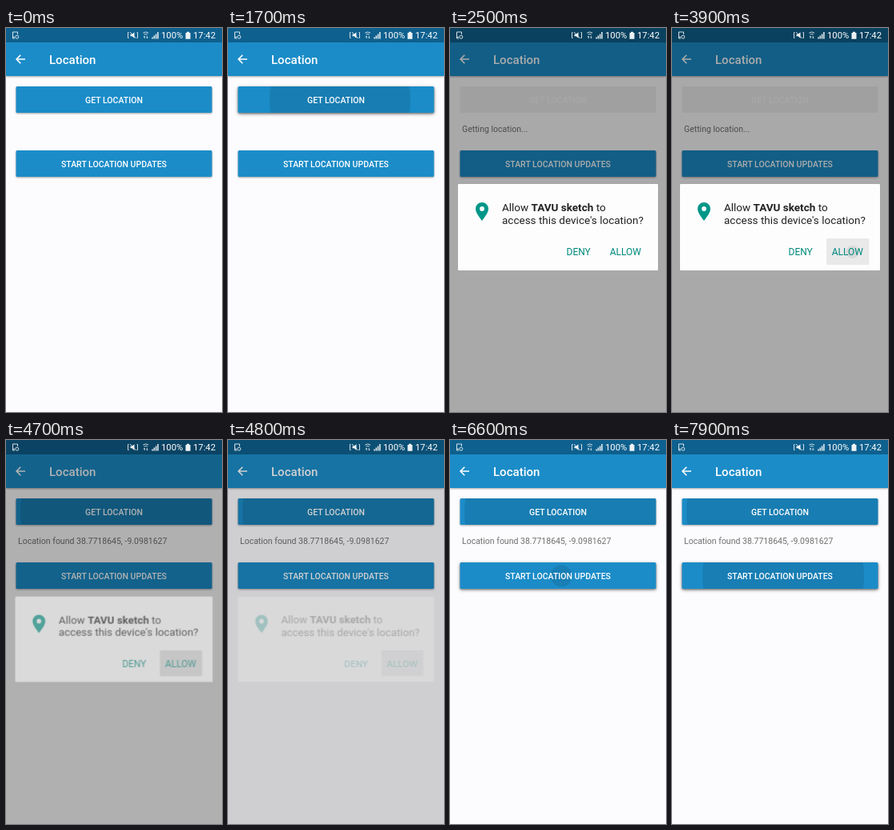
Write an HTML page that moves like this. It is 270x480 px and loops after 8000 ms.

```html
<!DOCTYPE html>
<html lang="en">
<head>
<meta charset="utf-8">
<title>Location</title>
<style>
  html, body { margin: 0; width: 100%; height: 100%; overflow: hidden; background: #fcfbfd; }
  svg { display: block; width: 100vw; height: 100vh; font-family: Roboto, Arial, sans-serif; }

  .button-label { font-size: 10.5px; font-weight: 500; fill: #fff; text-anchor: middle; }
  .status-text { font-size: 11.25px; fill: #fff; }
  .note { font-size: 10.5px; fill: #707070; }
  .question { font-size: 13.5px; fill: #212121; }
  .action { font-size: 12px; fill: #00897b; }
  .shadow { filter: blur(1px); opacity: .34; }
  .lift { filter: blur(2px); opacity: 0; }

  /* One shared 8 s clock: 1% = 80 ms */
  .anim { animation: 8s linear infinite; }
  .step { animation: 8s step-end infinite; }

  #get-lift { animation-name: get-lift; }
  #get-ripple { animation-name: get-ripple; }
  #get-on { animation-name: get-on; }
  #get-off, #pending { animation-name: waiting; }
  #found { animation-name: found; }
  #dim { animation-name: dim; }
  #dialog { animation-name: dialog; transform-origin: 134.5px 249px; }
  #allow-hold { animation-name: allow-hold; }
  #allow-ripple { animation-name: allow-ripple; }
  #start-lift { animation-name: start-lift; }
  #start-ripple { animation-name: start-ripple; }

  @keyframes get-lift {
    0%, 5% { opacity: 0; }
    8%, 27.4% { opacity: .4; }
    27.5%, 100% { opacity: 0; }
  }
  @keyframes get-ripple {
    0%, 5% { r: 0px; }
    27.5%, 100% { r: 122px; }
  }
  @keyframes get-on {
    0% { opacity: 1; }
    27.5% { opacity: 0; }
    56.25%, 100% { opacity: 1; }
  }
  @keyframes waiting {
    0% { opacity: 0; }
    27.5% { opacity: 1; }
    56.25%, 100% { opacity: 0; }
  }
  @keyframes found {
    0% { opacity: 0; }
    56.25%, 100% { opacity: 1; }
  }
  @keyframes dim {
    0%, 27.5% { opacity: 0; }
    30.6%, 58.5% { opacity: .33; }
    61.8%, 100% { opacity: 0; }
  }
  @keyframes dialog {
    0%, 27.5% { opacity: 0; transform: scale(.97); }
    30.6%, 56.9% { opacity: 1; transform: none; }
    58.75% { opacity: .55; transform: scale(.988); }
    60.9%, 100% { opacity: 0; transform: scale(.975); }
  }
  @keyframes allow-hold {
    0%, 43.75% { opacity: 0; }
    47.5%, 100% { opacity: .08; }
  }
  @keyframes allow-ripple {
    0%, 43.75% { r: 0px; }
    48.75% { r: 8px; }
    55% { r: 18px; }
    58%, 100% { r: 42px; }
  }
  @keyframes start-lift {
    0%, 80% { opacity: 0; }
    83%, 100% { opacity: .4; }
  }
  @keyframes start-ripple {
    0%, 80% { r: 0px; }
    100% { r: 107.7px; }
  }
</style>
</head>
<body>
<svg viewBox="0 0 270 480">
  <defs>
    <rect id="button" x="12.5" width="245" height="33" rx="1.5"/>
    <clipPath id="get-clip"><use href="#button" y="73"/></clipPath>
    <clipPath id="start-clip"><use href="#button" y="153"/></clipPath>
    <clipPath id="allow-clip"><rect x="193" y="263" width="53.5" height="33" rx="1.5"/></clipPath>
  </defs>

  <rect width="270" height="480" fill="#fcfbfd"/>

  <!-- App bar -->
  <rect class="shadow" y="40" width="270" height="21"/>
  <rect y="18" width="270" height="42" fill="#1b8cc8"/>
  <rect width="270" height="18" fill="#0e608e"/>
  <path d="M24 39H13.5M18.3 33.8L13.1 39l5.2 5.2" fill="none" stroke="#fff" stroke-width="1.6"/>
  <text x="54" y="45" font-size="15" font-weight="500" fill="#fff">Location</text>

  <!-- Get location -->
  <g id="get-off" class="step">
    <use href="#button" y="73" fill="#eeeeee"/>
    <text class="button-label" x="135" y="93.5" style="fill:#f9f9f9">GET LOCATION</text>
  </g>
  <g id="get-on" class="step">
    <use id="get-lift" class="lift anim" href="#button" y="74.5"/>
    <use class="shadow" href="#button" y="74"/>
    <use href="#button" y="73" fill="#1b8cc8"/>
    <g clip-path="url(#get-clip)">
      <circle id="get-ripple" class="anim" cx="140" cy="90" r="0" opacity=".11"/>
    </g>
    <text class="button-label" x="135" y="93.5">GET LOCATION</text>
  </g>
  <text id="pending" class="note step" x="15" y="130">Getting location...</text>
  <text id="found" class="note step" x="15" y="130">Location found 38.7718645, -9.0981627</text>

  <!-- Start updates -->
  <use id="start-lift" class="lift anim" href="#button" y="154.5"/>
  <use class="shadow" href="#button" y="154"/>
  <use href="#button" y="153" fill="#1b8cc8"/>
  <g clip-path="url(#start-clip)">
    <circle id="start-ripple" class="anim" cx="139" cy="170" r="0" opacity=".1"/>
  </g>
  <text class="button-label" x="135" y="173.5">START LOCATION UPDATES</text>

  <rect id="dim" class="anim" width="270" height="480"/>

  <!-- Permission dialog -->
  <g id="dialog" class="anim">
    <rect x="10" y="195" width="250" height="108" rx="1" fill="#fdfdfe"/>
    <path d="M40 241C36 235.5 32 230.5 32 226a8 8 0 0 1 16 0C48 230.5 44 235.5 40 241Z" fill="#009688"/>
    <circle cx="40" cy="226" r="2.9" fill="#fdfdfe"/>
    <text class="question" x="65" y="229">Allow <tspan font-weight="700">TAVU sketch</tspan> to</text>
    <text class="question" x="65" y="245">access this device's location?</text>
    <g clip-path="url(#allow-clip)">
      <rect id="allow-hold" class="anim" x="193" y="263" width="54" height="33" opacity="0"/>
      <circle id="allow-ripple" class="anim" cx="225.5" cy="280" r="0" opacity=".07"/>
    </g>
    <text class="action" x="145.5" y="284">DENY</text>
    <text class="action" x="199.7" y="284">ALLOW</text>
  </g>

  <!-- Status icons stay bright above the dimming -->
  <g fill="none" stroke="#fff" stroke-width=".9" opacity=".92">
    <path d="M11 13H8.5V5h6v3M8.5 11.3H11"/>
    <circle cx="13.8" cy="11.2" r="2"/>
    <path d="M153.5 5.5h-1v7h1M163.5 5.5h1v7h-1M155 5l7.5 8"/>
    <path d="M155.5 7.7h2l3-2.4v7.4l-3-2.4h-2Z" fill="#fff" stroke="none"/>
    <path d="M171.3 6.2q3.4-2.4 6.8 0M172.7 8.2q2-1.4 4 0"/>
    <path d="M173.2 13v-3l-1.2 1.2M176.2 10v3l1.2-1.2"/>
    <path d="M183 13.5v-2M185.3 13.5v-4M187.6 13.5v-6M189.9 13.5v-8.5" stroke-width="1.5"/>
    <path d="M224.5 6H226V4.8h3V6h1.5v7.7h-6Z" fill="#fff" stroke="none"/>
  </g>
  <text class="status-text" x="194" y="13.3">100%</text>
  <text class="status-text" x="234" y="13.3">17:42</text>
</svg>
</body>
</html>
```
